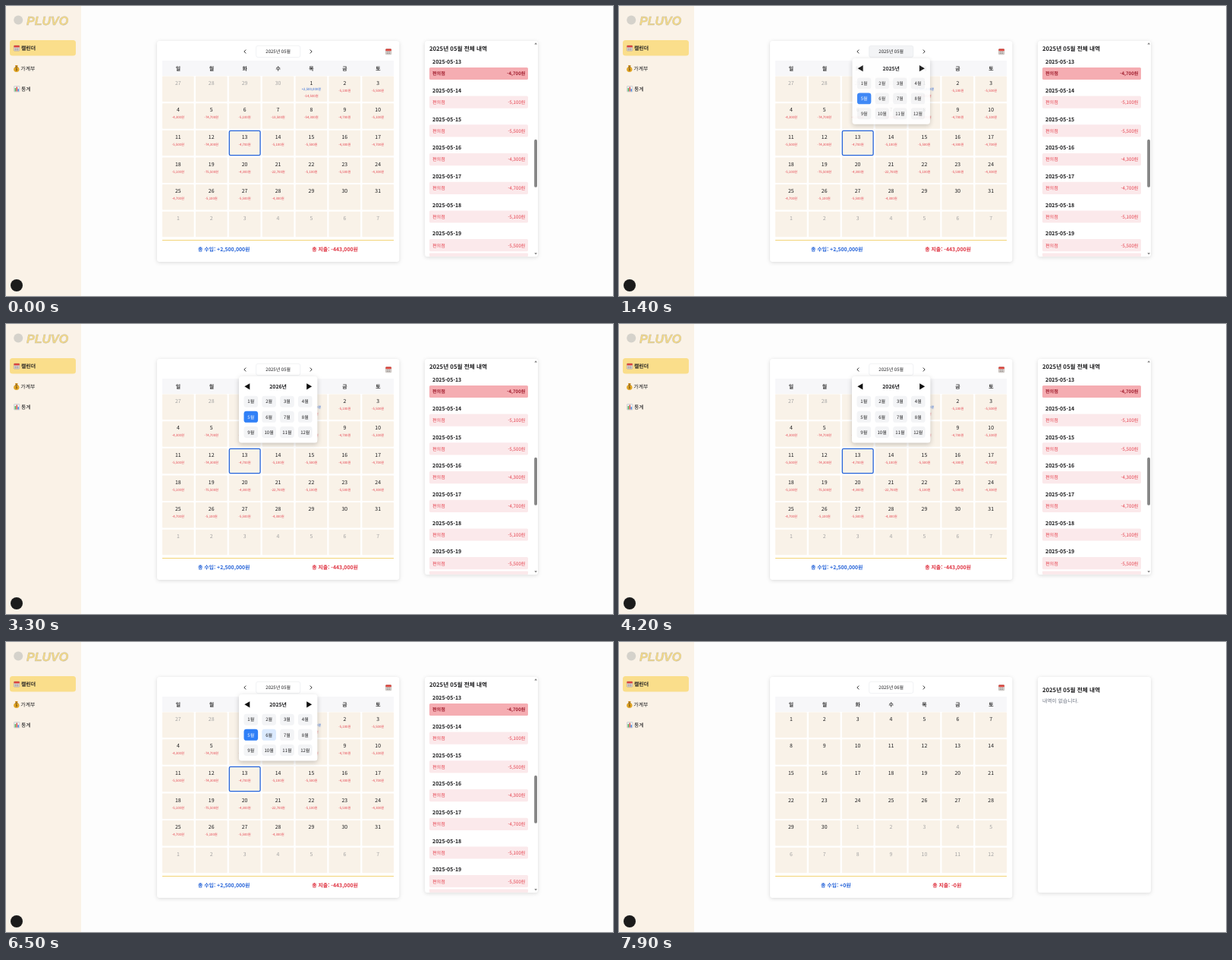
Animation of 800x382 px, one loop 8 s. Source, as an HTML page:

```html
<!DOCTYPE html>
<html lang="ko">
<head>
<meta charset="utf-8">
<title>캘린더</title>
<style>
  html, body { margin: 0; height: 100%; overflow: hidden; background: #fdfdfd; }
  svg { display: block; width: 100vw; height: 100vh; }
  text { font-family: "Noto Sans CJK KR", "Noto Sans CJK", "Noto Sans KR", sans-serif; text-rendering: geometricPrecision; }
  .brand { font: italic 700 16px "Liberation Sans", sans-serif; }
  .card { fill: #fff; filter: drop-shadow(0 1px 2.5px rgba(0, 0, 0, .14)); }
  .popup { fill: #fff; filter: drop-shadow(0 2px 3px rgba(0, 0, 0, .2)); }
</style>
</head>
<body>
<svg id="stage" viewBox="0 0 800 382"></svg>
<script>
const LOOP = 8000;
const INK = '#1c1c1e', RED = '#e5404d', BLUE = '#2563d8', CELL = '#f9f2e8';

// Markup helpers; text is placed by its vertical centre.
const rect = (x, y, w, h, fill, r = 0, more = '') =>
  `<rect x="${x}" y="${y}" width="${w}" height="${h}" rx="${r}" fill="${fill}" ${more}/>`;
const text = (x, y, size, str, fill = INK, weight = 400, anchor = 'middle', more = '') =>
  `<text x="${x}" y="${y + size * .37}" font-size="${size}" fill="${fill}" font-weight="${weight}" text-anchor="${anchor}" ${more}>${str}</text>`;
const path = (d, fill, more = '') => `<path d="${d}" fill="${fill}" ${more}/>`;
const circle = (x, y, r, fill) => `<circle cx="${x}" cy="${y}" r="${r}" fill="${fill}"/>`;
const line = d => path(d, 'none', 'stroke="#333" stroke-width="1"');
const group = (id, body) => `<g id="${id}">${body}</g>`;

const calendarIcon = (x, y) =>
  rect(x, y, 7.4, 7.2, '#e9e4e2', .8, 'stroke="#8b8078" stroke-width=".4"') +
  rect(x, y, 7.4, 2.6, '#d9433c', .8) +
  [1.2, 3, 4.8].map(dx => rect(x + dx, y + 3.5, 1.2, 1, '#77706d') + rect(x + dx, y + 5.3, 1.2, 1, '#77706d')).join('');
const bagIcon = (x, y) =>
  path(`M${x + 2} ${y}h3.6l-.9 2.4h-1.8z`, '#c98b1d') +
  `<ellipse cx="${x + 3.8}" cy="${y + 5.6}" rx="3.7" ry="3.4" fill="#e0a526"/>` +
  rect(x + 2.1, y + 1.9, 3.4, .8, '#6d4a14') +
  text(x + 3.8, y + 5.7, 4.4, '$', '#5c3c10', 700);
const chartIcon = (x, y) =>
  rect(x, y, 7.4, 7.4, '#eceff1', .6, 'stroke="#9aa5ab" stroke-width=".4"') +
  rect(x + 1, y + 2.5, 1.4, 4.4, '#4caf50') + rect(x + 3, y + 1, 1.4, 5.9, '#d9433c') +
  rect(x + 5, y + 3.6, 1.4, 3.3, '#3b7dd8');

const sidebar = () =>
  rect(0, 0, 99, 382, '#faf2e7') +
  circle(16.2, 18.5, 6, '#d5d2cb') +
  '<text class="brand" x="27" y="24.5" fill="#f6da82" stroke="#bdb7a8" stroke-width=".45">PLUVO</text>' +
  rect(5, 45, 87, 20.6, '#fade8b', 3.5) +
  calendarIcon(10.4, 52) + text(20, 55.7, 6.9, '캘린더', INK, 700, 'start') +
  bagIcon(10, 78) + text(19.3, 82.6, 6.9, '가계부', INK, 500, 'start') +
  chartIcon(10.6, 105.6) + text(20, 109.3, 6.9, '통계', INK, 500, 'start') +
  circle(14, 368, 8, '#1b1b1b');

const calendarFrame = () =>
  rect(199, 46, 319.3, 291, '#fff', 3.5, 'class="card"') +
  line('M316.2 57.6l-2.4 2.4l2.4 2.4') + line('M400.8 57.6l2.4 2.4l-2.4 2.4') +
  rect(329.6, 52.3, 58.2, 15.3, '#fff', 2.6, 'id="monthButton" stroke="#e3e5e9" stroke-width=".5"') +
  text(358.7, 60, 6, '', INK, 500, 'middle', 'id="monthLabel"') +
  calendarIcon(500.4, 56.6) +
  rect(206, 72, 305, 20, '#f7f7f9') +
  [...'일월화수목금토'].map((d, i) => text(226.9 + i * 43.9, 82.3, 6.9, d, '#333', 600)).join('') +
  rect(206, 308, 305, .9, '#f2cf66');

// `before` is the count of leading days from the previous month, `amounts` the spending per day in 100 won.
function monthGrid(before, previousLength, length, amounts, selected) {
  let out = '';
  for (let i = 0; i < 42; i++) {
    const x = 206 + i % 7 * 43.9, y = 92.5 + Math.floor(i / 7) * 35.65, cx = x + 20.8;
    const day = i - before + 1, inside = day > 0 && day <= length;
    const label = day < 1 ? previousLength + day : inside ? day : day - length;
    const border = inside && day === selected ? `stroke="${BLUE}" stroke-width="1.3"` : '';
    out += border ? rect(x + .5, y + .5, 40.8, 32.4, CELL, 1.6, border) : rect(x, y, 41.7, 33.5, CELL, .8);
    out += text(cx, y + 8.7, 6.9, label, inside ? INK : '#a3a3a3');
    if (!inside || !amounts[day - 1]) continue;
    const income = day === 1;
    if (income) out += text(cx, y + 17.4, 4.3, '+2,500,000원', BLUE);
    out += text(cx, y + (income ? 25.6 : 18.6), 4.3, won(amounts[day - 1]), RED);
  }
  return out;
}
const won = hundreds => `-${(hundreds * 100).toLocaleString('en-US')}원`;

const totals = (income, x1, expense, x2) =>
  text(x1, 320.6, 6.9, `총 수입: +${income}원`, BLUE, 700) +
  text(x2, 320.6, 6.9, `총 지출: -${expense}원`, '#df3240', 700);

const panel = () => rect(552, 46, 149, 284.3, '#fff', 3.5, 'class="card"');
const panelTitle = y => text(558, y, 7.7, '2025년 05월 전체 내역', INK, 700, 'start');

function history(amounts) {
  let out = panelTitle(56);
  for (let i = 0; i < 7; i++) {
    const y = 73.6 + i * 37.7, active = i === 0;
    const color = active ? '#a01c2c' : RED, weight = active ? 700 : 500;
    out += text(562, y, 7, `2025-05-${13 + i}`, INK, 600, 'start') +
      rect(558, y + 7.3, 130, 16.2, active ? '#f5adb2' : '#fbe9eb', 1.7) +
      text(562, y + 15.5, 6.1, '편의점', color, weight, 'start') +
      text(684.4, y + 15.5, 6.1, won(i === 6 ? 55 : amounts[12 + i]), color, active ? 700 : 400, 'end');
  }
  return out + rect(558, 325.5, 130, 4.5, '#fbe9eb', 1) +
    rect(696.2, 175.8, 3.8, 63, '#858585', 1.9) +
    path('M696.4 50.4h3.6l-1.8-2.2z', '#777') + path('M696.4 325.2h3.6l-1.8 2.2z', '#777');
}

const monthPicker = () =>
  rect(307, 69, 103.4, 87.6, '#fff', 3.5, 'class="popup"') +
  path('M314.3 82.3l7-4.1v8.2z', '#111') + path('M403.2 82.3l-7-4.1v8.2z', '#111') +
  text(358.6, 82.3, 6.9, '', INK, 600, 'middle', 'id="year"') +
  Array.from({ length: 12 }, (_, i) => {
    const x = 322.8 + i % 4 * 23.83, y = 102.2 + Math.floor(i / 4) * 20.1;
    return rect(x - 9.3, y - 7.5, 18.6, 15, '#f3f4f6', 3.4, `id="box${i + 1}"`) +
      text(x, y, 6, `${i + 1}월`, INK, 500, 'middle', `id="name${i + 1}"`);
  }).join('');

const spending = [145, 51, 55, 43, 747, 51, 135, 543, 47, 51, 55, 743, 47, 51, 55, 43, 47, 51, 755,
  43, 227, 51, 55, 43, 47, 51, 55, 43];

document.getElementById('stage').innerHTML =
  rect(0, 0, 800, 382, '#fdfdfd') + sidebar() + calendarFrame() + panel() +
  group('may', monthGrid(4, 30, 31, spending, 13) + totals('2,500,000', 287.2, '443,000', 433.6) + history(spending)) +
  group('june', monthGrid(0, 31, 30, [], 0) + totals('0', 285.8, '0', 432.2) +
    panelTitle(63) + text(558, 77.8, 6.8, '내역이 없습니다.', '#6b7280', 400, 'start')) +
  group('picker', monthPicker());

const el = id => document.getElementById(id);
const ramp = (t, start, length = 150) => Math.min(1, Math.max(0, (t - start) / length));
const pulse = (t, on, off) => ramp(t, on) - ramp(t, off);
const easeOut = u => 1 - (1 - u) ** 2;
const mix = (a, b, p) => `rgb(${a.map((v, i) => v + (b[i] - v) * p)})`;
const WHITE = [255, 255, 255], GREY = [243, 244, 246], HOVER = [219, 234, 254], PICKED = [47, 127, 247];

const OPEN = 1260, NEXT_YEAR = 3300, PREVIOUS_YEAR = 4700, PICK = 6590;

function draw(t) {
  const june = t >= PICK;
  el('may').style.display = june ? 'none' : '';
  el('june').style.display = june ? '' : 'none';
  el('monthLabel').textContent = `2025년 0${june ? 6 : 5}월`;
  el('monthButton').setAttribute('fill', mix(WHITE, GREY, pulse(t, 800, 1650)));

  const shown = easeOut(ramp(t, OPEN, 200)) - easeOut(ramp(t, PICK, 200));
  const scale = .9 + .1 * shown;
  el('picker').setAttribute('opacity', shown);
  el('picker').setAttribute('transform', `translate(358.6 69) scale(${scale}) translate(-358.6 -69)`);

  el('year').textContent = t >= NEXT_YEAR && t < PREVIOUS_YEAR ? '2026년' : '2025년';
  const picked = 1 - pulse(t, NEXT_YEAR, PREVIOUS_YEAR);
  el('box5').setAttribute('fill', mix(GREY, PICKED, picked));
  el('name5').setAttribute('fill', mix([28, 28, 30], WHITE, picked));
  el('box2').setAttribute('fill', mix(GREY, HOVER, pulse(t, 5350, 5500)));
  el('box6').setAttribute('fill', mix(GREY, HOVER, ramp(t, 5550)));
}

function tick() {
  draw(performance.now() % LOOP);
  requestAnimationFrame(tick);
}
tick();
</script>
</body>
</html>
```
